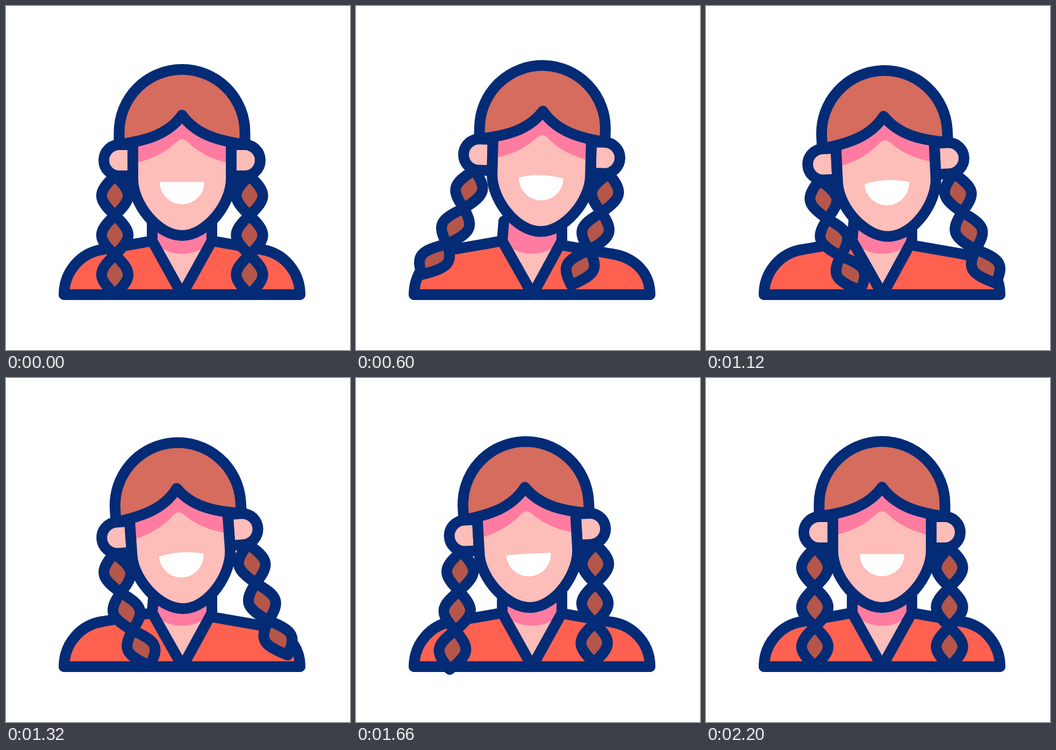
These frames come from a looping animation (640x640 px, 2400 ms). An HTML page:

```html
<!DOCTYPE html>
<html lang="en">
<head>
<meta charset="utf-8">
<title>Girl with braids</title>
<style>
  html, body { margin: 0; width: 100%; height: 100%; overflow: hidden; background: #fff; }
  svg { display: block; width: 100vw; height: 100vh; }
  .line { stroke: #042b76; stroke-width: 20; stroke-linecap: round; stroke-linejoin: round; }
  .none { fill: none; }
  .skin { fill: #fdbdb9; }
  .shade { fill: #ff7ca0; }
  .hair { fill: #d56c5d; }
  .braid { fill: #b5564a; }
  .shirt { fill: #ff6150; }
</style>
</head>
<body>
<svg viewBox="0 0 640 640">
  <defs>
    <clipPath id="faceClip">
      <path d="M236 195V322C236 368 282 427 327.5 427S419 368 419 322V195Z"/>
    </clipPath>
  </defs>

  <g id="body">
    <path id="shirt" class="shirt line"/>
    <path id="neckSkin" class="skin"/>
    <path class="shade" d="M272 395V437Q296 461 327.5 461T383 437V395Z"/>
    <path id="neckLines" class="none line"/>
    <path class="none line" d="M108 537H547"/>
  </g>

  <g id="leftBraid"></g>
  <g id="rightBraid"></g>

  <g id="head">
    <path class="skin line" d="M236 258H211a29 29 0 0 0 0 58H236Z"/>
    <path class="skin line" d="M419 258H444a29 29 0 0 1 0 58H419Z"/>
    <g clip-path="url(#faceClip)">
      <path class="shade" d="M236 195H419V430H236Z"/>
      <path class="skin" d="M236 293C273 286 300 270 317 253Q327.5 243 338 253C355 270 382 286 419 293V430H236Z"/>
    </g>
    <path class="none line" d="M236 256V322C236 368 282 427 327.5 427S419 368 419 322V256"/>
    <path class="hair line" d="M210.5 257.5V235a117 117 0 0 1 234 0V257.5C397 251 354 240 327.5 203C301 240 258 251 210.5 257.5Z"/>
    <path id="mouth" fill="#fff"/>
  </g>
</svg>
<script>
const LOOP = 2400, START = 120, END = 2200;
const PIVOT = { x: 327.5, y: 287 };
const LINK = 73.5, BULGE = 33;
const LINK_GAINS = [0.38, 0.65, 1];   // lower links swing further

const $ = id => document.getElementById(id);
const set = (id, name, value) => $(id).setAttribute(name, value);
const radians = deg => deg * Math.PI / 180;
const smooth = u => u * u * (3 - 2 * u);

// Rests at 0 outside START..END and eases between the turning points given as [time, value].
function sway(...turns) {
  const keys = [[START, 0], ...turns, [END, 0]];
  return t => {
    const i = keys.findIndex(key => key[0] > t);
    if (i < 1) return 0;
    const [t0, v0] = keys[i - 1], [t1, v1] = keys[i];
    return v0 + (v1 - v0) * smooth((t - t0) / (t1 - t0));
  };
}

const shift = sway([420, 20.5], [1000, 10], [1500, -10]);
const bob = sway([360, 0], [650, -8], [860, 1.6], [1320, 2.2], [1720, 0]);
const tilt = sway([420, 2], [1420, -4.1]);
const smile = sway([360, 1], [1240, 1], [1780, 0]);
const leftSwing = sway([460, -47], [1190, 32], [1780, -13]);
const rightSwing = sway([460, -34], [1200, 33], [1820, -8]);

function makeBraid(id) {
  return LINK_GAINS.map(() => {
    const path = document.createElementNS("http://www.w3.org/2000/svg", "path");
    path.setAttribute("class", "braid line");
    $(id).append(path);
    return path;
  });
}
const leftPaths = makeBraid("leftBraid");
const rightPaths = makeBraid("rightBraid");

// Two strands bulging apart between crossings p and q; the bulge leans half as far as the link.
function linkPath(p, q, angle) {
  const bx = BULGE * Math.cos(angle / 2), by = -BULGE * Math.sin(angle / 2);
  const vx = (q.x - p.x) * 0.42, vy = (q.y - p.y) * 0.42;
  const near = side => `${p.x + vx + side * bx} ${p.y + vy + side * by}`;
  const far = side => `${q.x - vx + side * bx} ${q.y - vy + side * by}`;
  return `M${p.x} ${p.y}C${near(-1)} ${far(-1)} ${q.x} ${q.y}C${far(1)} ${near(1)} ${p.x} ${p.y}Z`;
}

function drawBraid(paths, start, swing) {
  let p = start;
  paths.forEach((path, i) => {
    const angle = radians(swing * LINK_GAINS[i]);
    const q = { x: p.x + LINK * Math.sin(angle), y: p.y + LINK * Math.cos(angle) };
    path.setAttribute("d", linkPath(p, q, angle));
    p = q;
  });
}

function drawBody(lean) {
  const neckX = 272 + 3 * lean, tipX = 327.5 + lean, drop = 8 * lean;
  set("shirt", "d", `M108 537C108 495 138 459 180 453L272 437H383V${437 + drop}L475 ${453 + drop}`
    + `C517 ${459 + drop} 547 495 547 537Z`);
  set("neckSkin", "d", `M${neckX} 395L272 437L${tipX} 537L383 437V395Z`);
  set("neckLines", "d", `M${neckX} 400L272 437L${tipX} 537L383 437V400`);
}

function draw(t) {
  const dx = shift(t), dy = bob(t), turn = tilt(t), grin = smile(t);
  const c = Math.cos(radians(turn)), s = Math.sin(radians(turn));
  const onHead = (x, y) => ({
    x: PIVOT.x + dx + (x - PIVOT.x) * c - (y - PIVOT.y) * s,
    y: PIVOT.y + dy + (x - PIVOT.x) * s + (y - PIVOT.y) * c
  });

  drawBody(grin);
  set("head", "transform", `translate(${dx} ${dy}) rotate(${turn} ${PIVOT.x} ${PIVOT.y})`);
  set("mouth", "d", `M286 327.5Q327.5 ${327.5 - 11 * grin} 369 327.5A41.5 41.5 0 0 1 286 327.5Z`);
  drawBraid(leftPaths, onHead(202.5, 316), leftSwing(t));
  drawBraid(rightPaths, onHead(453, 316), rightSwing(t));
}

const started = performance.now();
function tick() {
  draw((performance.now() - started) % LOOP);
  requestAnimationFrame(tick);
}
draw(0);
requestAnimationFrame(tick);
</script>
</body>
</html>
```
